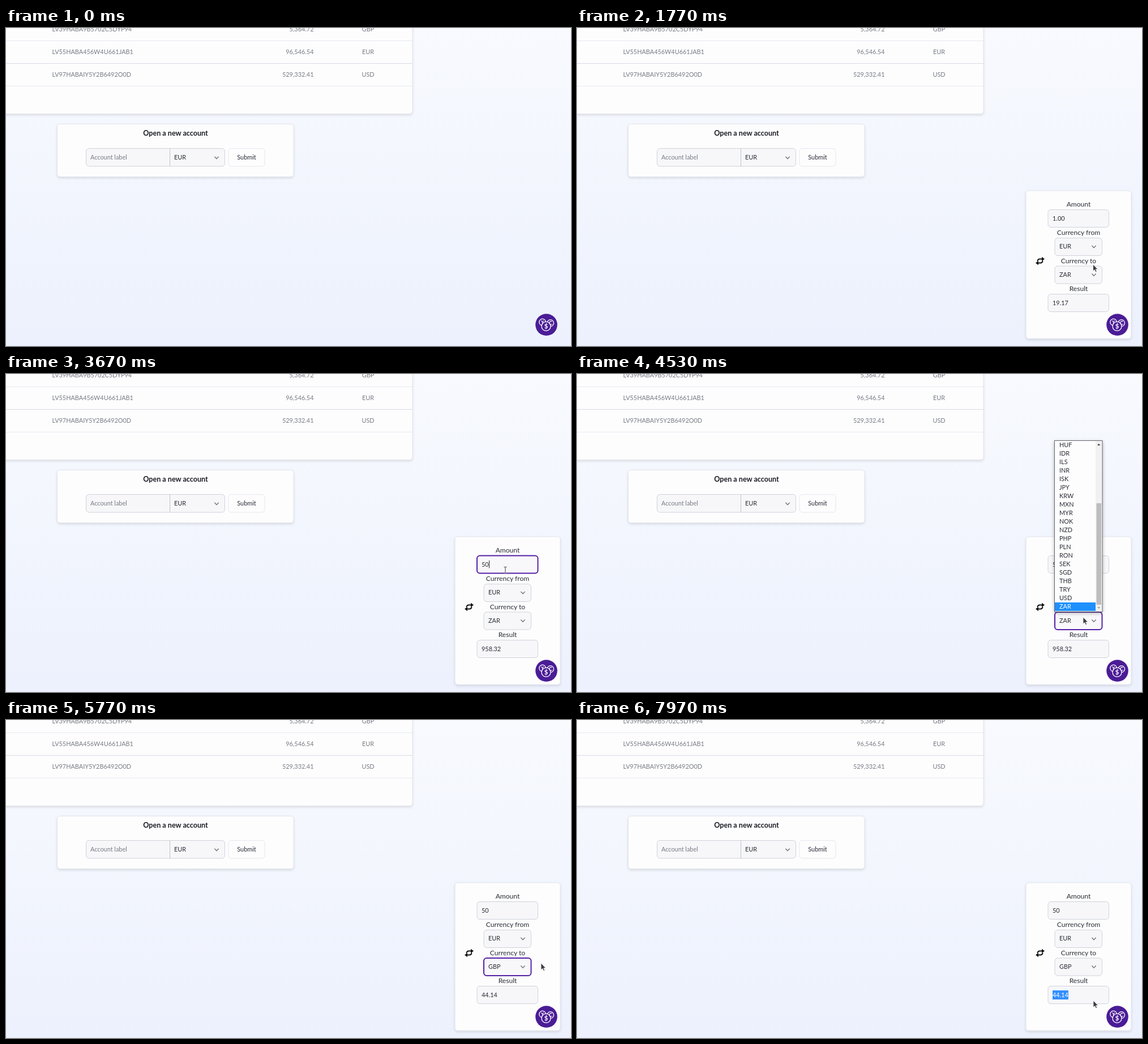
These frames come from a looping animation (998x561 px, 8000 ms). An HTML page:

```html
<!DOCTYPE html>
<html lang="en">
<head>
<meta charset="utf-8">
<title>Currency converter</title>
<style>
  html, body { margin: 0; width: 100%; height: 100%; overflow: hidden; background: #f2f6fe; }
  svg { display: block; width: 998px; height: 561px; font: 10.9px Lato, "Open Sans", sans-serif; }
  text { fill: #292c34; white-space: pre; }
  .row { fill: #777b83; }
  .label { font-size: 12.1px; text-anchor: middle; }
  .title { font-size: 12.6px; font-weight: 700; text-anchor: middle; fill: #1b1d24; }
  .end { text-anchor: end; }
  .mid { text-anchor: middle; }
  .card { fill: #fdfdfe; stroke: #e3e5ec; filter: drop-shadow(0 2px 2px #0000001c); }
  .field { fill: #f7f7fa; stroke: #d0d2da; }
  .focus { fill: #f8f8fb; stroke: #5521a5; stroke-width: 2; }
  .chevron { fill: none; stroke: #777b83; stroke-width: 1.5; stroke-linecap: round; stroke-linejoin: round; }
  .coin { fill: #4a1c96; stroke: #fff; stroke-width: 1.3; }
</style>
</head>
<body>
<svg id="stage" viewBox="0 0 998 561">
  <defs>
    <linearGradient id="sky" x2="0" y2="1">
      <stop stop-color="#f8fafe"/><stop offset="1" stop-color="#ecf1fd"/>
    </linearGradient>
    <clipPath id="listClip"><rect x="844" y="118" width="84" height="301"/></clipPath>
  </defs>
  <rect width="998" height="561" fill="url(#sky)"/>
  <g id="page"></g>
  <g id="panel"></g>
  <g id="fab">
    <circle cx="954.5" cy="523.5" r="19.3" fill="#4a1c96"/>
    <g class="coin">
      <circle cx="947.6" cy="519" r="5.8"/><circle cx="961.7" cy="520.5" r="5.8"/>
      <circle cx="954" cy="526.2" r="8"/>
    </g>
    <g fill="none" stroke="#fff" stroke-width="1.1">
      <path d="M945.3 516l2.2 2.7 2.2-2.7M947.5 518.7v3M964.4 518.2a2.8 2.8 0 1 0 .2 4"/>
    </g>
    <text x="954" y="530.2" class="mid" style="fill:#fff;font-weight:700;font-size:11.5px">$</text>
  </g>
  <g id="list"></g>
  <path id="arrow" d="M0 0V11.8L2.7 9.4L4.7 13.5L6.6 12.6L4.7 8.7H8.4Z"
        fill="#3b3b3f" stroke="#f4f4f6" stroke-width=".8"/>
  <path id="beam" d="M-2.5 -5.8Q0 -5.8 0 -4Q0 -5.8 2.5 -5.8M0 -4V4M-2.5 5.8Q0 5.8 0 4Q0 5.8 2.5 5.8"
        fill="none" stroke="#77777c" stroke-width="1.4"/>
</svg>
<script>
const LOOP = 8000;
const OPEN_PANEL = 1050, FOCUS = 2700, OPEN_LIST = 4340, PICK = 5330, BLUR = 6790;
const ROW = 15, LIST_TOP = 118, SCROLL_MAX = 11;
const codes = ('AUD BGN BRL CAD CHF CNY CZK DKK EUR GBP HKD HUF IDR ILS INR ISK JPY KRW ' +
  'MXN MYR NOK NZD PHP PLN RON SEK SGD THB TRY USD ZAR').split(' ');

// time, x, y of the pointer
const path = [
  [100, 1005, 470], [800, 955, 523], [1130, 955, 523], [1700, 911.5, 417], [1850, 911.5, 417],
  [2450, 870, 338], [3330, 870, 338], [3640, 882, 346], [3800, 882, 346], [4280, 894, 429],
  [4560, 894, 429], [4760, 876, 300], [5000, 872, 290], [5220, 870, 261], [5380, 870, 261],
  [5740, 945, 429], [5950, 945, 429], [6600, 838, 484], [6800, 838, 484], [7340, 874, 485],
  [7570, 874, 485], [7960, 912, 495]
];
// time, amount typed, converted result
const typed = [
  [0, '1.00', '19.17'], [3060, '1.0', '19.17'], [3150, '1.', '19.17'], [3240, '', '0.00'],
  [3420, '5', '95.83'], [3560, '50', '958.32'], [PICK, '50', '44.14']
];
// time, rows the list is scrolled by
const scroll = [[0, SCROLL_MAX], [4780, 8], [4860, 5], [4940, 2], [5010, 0]];

const $ = id => document.getElementById(id);
function add(parent, name, attrs, content) {
  const el = document.createElementNS('http://www.w3.org/2000/svg', name);
  for (const key in attrs) el.setAttribute(key, attrs[key]);
  if (content !== undefined) el.textContent = content;
  return parent.appendChild(el);
}
const box = (parent, cls, x, y, width, height, rx = 5) =>
  add(parent, 'rect', { class: cls, x, y, width, height, rx });
const text = (parent, cls, x, y, content) => add(parent, 'text', { class: cls, x, y }, content);
const line = (parent, d, stroke) => add(parent, 'path', { d, stroke, fill: 'none' });
const chevron = (parent, x, y) =>
  add(parent, 'path', { class: 'chevron', d: `M${x - 3.3} ${y - 1.7}l3.3 3.4 3.3-3.4` });
const show = (el, on) => { el.style.display = on ? '' : 'none'; };

const page = $('page'), panel = $('panel'), list = $('list');

// Accounts table and new account form
box(page, 'card', -20, -20, 738, 171.5);
[['LV39HABA9B5702C5DYP94', '5,364.72', 'GBP'],
 ['LV55HABA456W4U661JAB1', '96,546.54', 'EUR'],
 ['LV97HABAIY5Y2B6492O0D', '529,332.41', 'USD']].forEach(([iban, sum, code], i) => {
  const y = 6 + i * 40;
  text(page, 'row', 81.5, y, iban);
  text(page, 'row end', 543.5, y, sum);
  text(page, 'row mid', 639.5, y, code);
  line(page, `M0 ${y + 16.5}H718`, i === 1 ? '#d9dae3' : '#e8e9ef');
});
box(page, 'card', 90.5, 169.5, 417.5, 93);
text(page, 'title', 299.5, 189.7, 'Open a new account');
box(page, 'field', 141.5, 212.5, 245, 31.5);
line(page, 'M289.5 212.5V244', '#bfc1cb');
text(page, 'row', 149, 232, 'Account label');
text(page, '', 297, 232, 'EUR');
chevron(page, 372, 229);
box(page, 'field', 393, 212.5, 64, 31.5).style.cssText = 'fill:#fdfdfe;stroke:#e5e7ec';
text(page, 'mid', 425, 232, 'Submit');

// Converter panel
box(panel, 'card', 793, 287, 186, 261);
['Amount', 'Currency from', 'Currency to', 'Result'].forEach((name, i) =>
  text(panel, 'label', 886, 315.2 + i * 49.7, name));
const amountBox = box(panel, 'field', 832, 320.5, 107.5, 31);
const fromBox = box(panel, 'field', 844, 370.5, 83.5, 31);
const toBox = box(panel, 'field', 844, 420, 83.5, 31);
box(panel, 'field', 832, 469.5, 107.5, 31);
const selection = add(panel, 'rect', { x: 840, y: 477, height: 16, fill: '#338fff' });
const amount = text(panel, '', 840, 339.5, '');
text(panel, '', 852, 389.2, 'EUR');
const target = text(panel, '', 852, 438.8, 'ZAR');
const result = text(panel, '', 840, 488.5, '');
const chosen = add(result, 'tspan', { style: 'fill:#fff' });
const rest = add(result, 'tspan', {});
chevron(panel, 913, 386);
chevron(panel, 913, 435.5);
const caret = add(panel, 'rect', { y: 329, width: 1, height: 13.5, fill: '#222' });
for (const turn of [0, 180]) {
  const swap = add(panel, 'g', { transform: `rotate(${turn} 818 411)` });
  add(swap, 'path', { d: 'M813.5 411.3Q813.8 407.5 817.5 407.5H822', fill: 'none', stroke: '#111', 'stroke-width': 2 });
  add(swap, 'path', { d: 'M821 403.7L826 407.5L821 411.3Z', fill: '#111' });
}

// Drop-down list
add(list, 'rect', { x: 843.5, y: 117.5, width: 84.5, height: 302, fill: '#fdfdfd',
  style: 'filter:drop-shadow(0 2px 3px #0005)' });
const rows = add(add(list, 'g', { 'clip-path': 'url(#listClip)' }), 'g', {});
const mark = add(rows, 'rect', { x: 844, width: 72, height: ROW, fill: '#1e90ff' });
const options = codes.map((code, i) => text(rows, '', 852, LIST_TOP + i * ROW + 11, code));
add(list, 'rect', { x: 916, y: 118, width: 11.5, height: 301, fill: '#f1f1f1' });
const thumb = add(list, 'rect', { x: 917.5, width: 8.5, height: 179, fill: '#bdbdbd' });
add(list, 'path', { d: 'M919 126l2.7-3.2 2.7 3.2z', fill: '#444' });
add(list, 'path', { d: 'M919 411l2.7 3.2 2.7-3.2z', fill: '#aaa' });
add(list, 'rect', { x: 843.5, y: 117.5, width: 84.5, height: 302, fill: 'none', stroke: '#66666c' });

const stepAt = (table, t) => table.filter(step => step[0] <= t).pop();

function pointerAt(t) {
  const next = path.findIndex(p => p[0] > t);
  if (next === 0) return [1020, 470];
  if (next < 0) return path[path.length - 1].slice(1);
  const [t0, x0, y0] = path[next - 1], [t1, x1, y1] = path[next];
  const u = (t - t0) / (t1 - t0), k = u * u * (3 - 2 * u);
  return [x0 + (x1 - x0) * k, y0 + (y1 - y0) * k];
}

function drawList(t, x, y) {
  const offset = stepAt(scroll, t)[1];
  const over = x > 844 && x < 916 && y > LIST_TOP && y < 418;
  const active = over ? Math.floor((y - LIST_TOP) / ROW) + offset : codes.length - 1;
  rows.setAttribute('transform', `translate(0 ${-offset * ROW})`);
  mark.setAttribute('y', LIST_TOP + active * ROW);
  options.forEach((el, i) => { el.style.fill = i === active ? '#fff' : ''; });
  thumb.setAttribute('y', 132 + 96 * offset / SCROLL_MAX);
}

function drawFields(t, x) {
  const [keyTime, value, converted] = stepAt(typed, t);
  const typing = t >= FOCUS && t < OPEN_LIST;
  amount.textContent = value;
  target.textContent = t < PICK ? 'ZAR' : 'GBP';
  amountBox.setAttribute('class', typing ? 'focus' : 'field');
  toBox.setAttribute('class', t >= OPEN_LIST && t < BLUR ? 'focus' : 'field');
  show(caret, typing && (t - Math.max(keyTime, FOCUS)) % 1000 < 500);
  caret.setAttribute('x', 840.5 + (value ? amount.getComputedTextLength() : 0));

  const count = t < BLUR ? 0 : Math.max(0, Math.min(5, Math.round((x - 840) / 5.6)));
  chosen.textContent = converted.slice(0, count);
  rest.textContent = converted.slice(count);
  selection.setAttribute('width', count ? chosen.getComputedTextLength() : 0);
}

function draw() {
  const t = performance.now() % LOOP;
  const [x, y] = pointerAt(t);
  const panelOpen = t >= OPEN_PANEL, listOpen = t >= OPEN_LIST && t < PICK;
  show(panel, panelOpen);
  show(list, listOpen);
  if (panelOpen) drawFields(t, x);
  if (listOpen) drawList(t, x, y);

  const overText = panelOpen && !listOpen && x > 832 && x < 940 && y > 320 && y < 352;
  show($('beam'), overText);
  show($('arrow'), !overText);
  $(overText ? 'beam' : 'arrow').setAttribute('transform', `translate(${x} ${y})`);
  requestAnimationFrame(draw);
}
draw();
</script>
</body>
</html>
```
